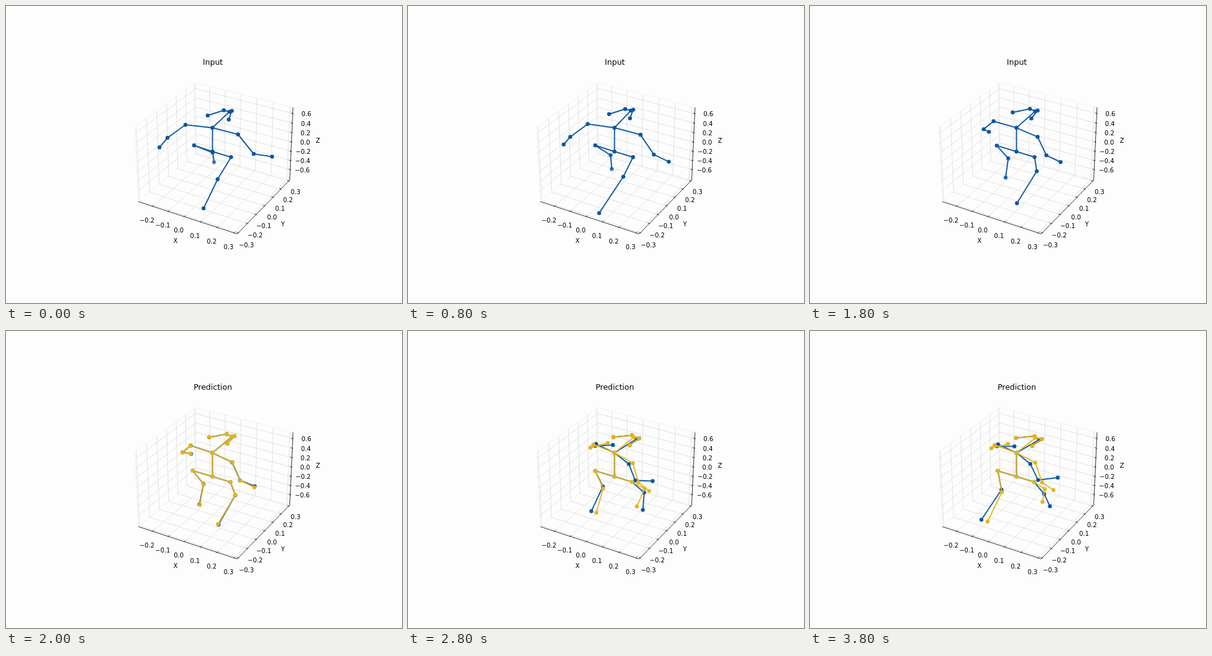
An HTML page that plays this animation: 640x480 px, repeating every 4 s.

```html
<!DOCTYPE html>
<html lang="en">
<head>
<meta charset="utf-8">
<title>Pose plot</title>
<style>
  html, body { margin: 0; width: 100%; height: 100%; overflow: hidden; background: #fdfdfd; }
  svg { display: block; width: 640px; height: 480px; }
  text { font: 10px "DejaVu Sans", sans-serif; fill: #000; text-anchor: middle; }
  #title { font-size: 12.5px; }
  path { fill: none; }
  .grid { stroke: #dfdfdf; stroke-width: .9; }
  .edge { stroke: #f0f0f0; stroke-width: .9; }
  .axis { stroke: #1a1a1a; stroke-width: .9; }
  .bones { stroke-width: 2; stroke-linejoin: round; stroke-linecap: round; }
</style>
</head>
<body>
<svg viewBox="0 0 640 480">
  <g id="box"></g>
  <g id="pose"></g>
  <text id="title" x="334.3" y="94.6">Input</text>
</svg>
<script>
const STEPS = 20, STEP_MS = 200, SPLIT = 10;
const byId = id => document.getElementById(id);

// Perspective camera: elevation 30, azimuth -60, distance 10. Input runs 0..1 per axis.
function project(x, y, z) {
  const a = (x - .5) * 1.1905, b = (y - .5) * 1.1905, c = (z - .5) * .8929;
  const right = .866 * a + .5 * b;
  const up = -.25 * a + .433 * b + .866 * c;
  const depth = 10 - (.433 * a - .75 * b + .5 * c);
  return [338.5 + 1537 * right / depth, 240.3 - 1537 * up / depth];
}

const path = (cls, pts) => `<path class="${cls}" d="M${pts.map(p => p.map(v => v.toFixed(2)).join(" ")).join("L")}"/>`;
const line3 = (cls, ...pts) => path(cls, pts.map(p => project(...p)));
const label = (s, [x, y]) => `<text x="${x}" y="${y + 3.6}">${s}</text>`;
const number = v => (v < -.01 ? "\u2212" : "") + Math.abs(v).toFixed(1);
const shift = ([x, y], dx, dy) => [x + dx, y + dy];

function tick([x, y], dx, dy) {
  const n = Math.hypot(dx, dy), ux = dx / n, uy = dy / n;
  return path("axis", [[x - ux * 1.4, y - uy * 1.4], [x + ux * 2.6, y + uy * 2.6]]);
}

function drawBox() {
  let grid = "", ticks = "", text = "";
  for (let i = 0; i < 6; i++) {
    const x = .15 + .164 * i, at = project(x, 0, 0);
    grid += line3("grid", [x, 0, 0], [x, 1, 0], [x, 1, 1]);
    ticks += tick(at, 1, -1);
    text += label(number(-.2 + .1 * i), shift(at, -9, 22.3));
  }
  for (let i = 0; i < 7; i++) {
    const y = .02 + .16 * i, z = .148 + .1285 * i;
    const atY = project(1, y, 0), atZ = project(1, 1, z);
    grid += line3("grid", [1, y, 0], [0, y, 0], [0, y, 1]);
    grid += line3("grid", [0, 0, z], [0, 1, z], [1, 1, z]);
    ticks += tick(atY, -160, -51) + tick(atZ, -160, -51);
    text += label(number(-.3 + .1 * i), shift(atY, 13 - .35 * i, 19.5 - .4 * i));
    text += label(number(-.6 + .2 * i), shift(atZ, i < 3 ? 19.5 : 22, .9));
  }
  const edges = line3("edge", [0, 0, 0], [0, 0, 1], [0, 1, 1], [1, 1, 1])
    + line3("edge", [0, 0, 0], [0, 1, 0], [1, 1, 0]) + line3("edge", [0, 1, 0], [0, 1, 1]);
  const axes = line3("axis", [0, 0, 0], [1, 0, 0], [1, 1, 0], [1, 1, 1]);
  text += label("X", [274, 379]) + label("Y", [447.6, 352]) + label("Z", [504.2, 217.5]);
  byId("box").innerHTML = edges + grid + axes + ticks + text;
}

// Clocks: the body turns, peaks and eases back; the left leg strides evenly.
const clamp = v => Math.max(0, Math.min(1, v));
const turn = t => t < 2.5 ? 0 : (1 - Math.cos(Math.PI * (t - 2.5) / 14)) / 2;
const stride = t => t / (STEPS - 1);
const bump = t => Math.sin(Math.PI * clamp(t / 16.5));
const growth = t => Math.sin(Math.PI / 2 * clamp((t - 9.6) / 7.4));

// A joint goes from one place to another, bowed by bend; drift is the full prediction error.
const joint = (from, to, bend = [0, 0], drift = [0, 0], clock = turn) => ({ from, to, bend, drift, clock });
const fixed = at => joint(at, at);
const NOD = [-1.8, -3];
const JOINTS = {
  neck: fixed([333.7, 196.8]),
  pelvis: fixed([333.7, 235.2]),
  nose: joint([361, 171], [371.3, 176], NOD, [-6, -3]),
  eyeL: joint([352, 168.5], [363.7, 170], NOD),
  earL: joint([326, 177], [333.5, 172.5], NOD),
  eyeR: joint([365, 169.5], [375.5, 175], NOD),
  earR: joint([360, 183.5], [359, 186], NOD),
  shoulderL: joint([290, 192], [305, 182.5], [0, -1.5], [-5.5, 1]),
  elbowL: joint([261, 213], [305.5, 184], [0, -1], [-9, 3.3]),
  wristL: joint([248, 228.5], [337.3, 183], [1.5, -5], [-10.5, -4]),
  shoulderR: joint([375, 207.5], [354.5, 215.5], [2, .5], [8, -2]),
  elbowR: joint([400.3, 239], [366, 241], [-3, 1.5], [6.5, 4]),
  wristR: joint([430, 243.5], [398, 236.5], [-11, 12], [-7, 20]),
  hipL: joint([304, 225.3], [303.5, 226], [-2, 0]),
  kneeL: joint([334, 237], [309.5, 256.5], [-2, 0], [.5, 4], stride),
  ankleL: joint([336.3, 252.5], [277, 305], [8, 0], [10, 3], stride),
  hipR: joint([363.7, 244.3], [362, 244]),
  kneeR: joint([342, 280], [381.5, 262], [7, -5], [1, -8]),
  ankleR: joint([319.3, 327], [393.5, 279.5], [-18, 13], [-12, -7])
};
const CHAINS = [
  "neck nose eyeL earL", "nose eyeR earR",
  "neck shoulderL elbowL wristL", "neck shoulderR elbowR wristR",
  "neck pelvis", "pelvis hipL kneeL ankleL", "pelvis hipR kneeR ankleR"
].map(s => s.split(" "));

function poseAt(t, error) {
  const pose = {};
  for (const [name, j] of Object.entries(JOINTS)) {
    const p = j.clock(t);
    pose[name] = [0, 1].map(k =>
      j.from[k] + (j.to[k] - j.from[k]) * p + j.bend[k] * bump(t) + j.drift[k] * error);
  }
  return pose;
}

function figure(pose, t, color, alpha) {
  const far = Math.min(1, .7 + .018 * t);
  const fade = { ankleL: far, kneeL: (1 + far) / 2 };
  const bones = CHAINS.map(c => path("bones", c.map(n => pose[n]))).join("");
  const dots = Object.entries(pose).map(([n, [x, y]]) =>
    `<circle cx="${x.toFixed(2)}" cy="${y.toFixed(2)}" r="3.2" opacity="${fade[n] || 1}"/>`).join("");
  return `<g stroke="${color}" opacity="${alpha}">${bones}</g><g fill="${color}">${dots}</g>`;
}

let shown = -1;
function render() {
  const step = Math.floor(performance.now() / STEP_MS) % STEPS;
  if (step !== shown) {
    shown = step;
    const predicting = step >= SPLIT;
    let out = figure(poseAt(step, 0), step, "#0c57a1", .95);
    if (predicting) out += figure(poseAt(step, growth(step)), step, "#e5b41a", .92);
    byId("pose").innerHTML = out;
    byId("title").textContent = predicting ? "Prediction" : "Input";
  }
  requestAnimationFrame(render);
}

drawBox();
render();
</script>
</body>
</html>
```
